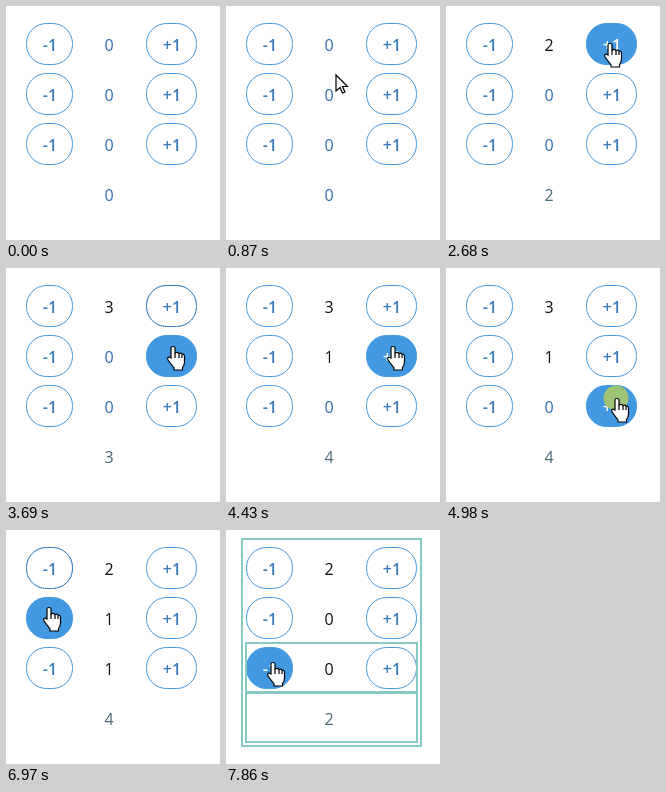
An HTML page with a canvas for the animation above (8000 ms loop, 214 by 234 pixels).

```html
<!DOCTYPE html>
<html lang="en">
<head>
<meta charset="utf-8">
<title>Counters</title>
<style>
html, body { margin: 0; width: 100%; height: 100%; overflow: hidden; background: #fff }
canvas { display: block }
</style>
</head>
<body>
<canvas id="stage" width="214" height="234"></canvas>
<script>
const ctx = document.getElementById('stage').getContext('2d');
const LOOP = 8000, BLUE = '#4299e1', INK = '#2f6cac';

// press time, update time, end of highlight, row, change
const clicks = [
  [1290, 1490, 1750, 0, 1], [2210, 2410, 2680, 0, 1], [3110, 3300, 3500, 0, 1],
  [4030, 4230, 4430, 1, 1], [4960, 5180, 5380, 2, 1], [5970, 6170, 6370, 0, -1],
  [7040, 7240, 7440, 1, -1], [7720, 7860, 8000, 2, -1]
].map(([press, update, end, row, delta]) => ({ press, update, end, row, delta }));

// time, x, y of the pointer
const path = [
  [390, 136, 206], [700, 84, 84], [1150, 163, 37], [3480, 163, 37], [3680, 166, 78],
  [4430, 166, 78], [4900, 170, 130], [5380, 170, 130], [5900, 36, 36],
  [6370, 36, 36], [6750, 42, 77], [7440, 42, 77], [7580, 43, 88], [7650, 46, 132], [8000, 46, 132]
];

const hand = new Path2D('M-1 12V2Q-1 .5 1 .5T3 2V7q2-1.5 4 .5q2-1 3 .8q2.5-.5 2.5 2.2V16q0 3-2 5.5V24H2V22L-4 14Q-5 11-3 11Z');
const knuckles = new Path2D('M3 7v5M7 8v4M10 9v3');
const arrow = new Path2D('M0 0V16L4 12.5L6.5 18L9 17L6.5 11.5H11.5Z');

function pointerAt(t) {
  if (t < path[0][0]) return null;
  const i = Math.max(1, path.findIndex(p => p[0] > t));
  const [t0, x0, y0] = path[i - 1], [t1, x1, y1] = path[i];
  const u = (t - t0) / (t1 - t0), k = u * u * (3 - 2 * u);
  return { x: x0 + (x1 - x0) * k, y: y0 + (y1 - y0) * k };
}

function label(text, x, y, color, weight = 400) {
  ctx.font = `${weight} 16px "Open Sans", "Noto Sans", sans-serif`;
  ctx.fillStyle = color;
  ctx.fillText(text, x, y);
}

function button(row, delta, pointer, t) {
  const x = delta < 0 ? 20.5 : 140.5, w = delta < 0 ? 46 : 50, y = 17.5 + row * 50, h = 41;
  const hover = pointer && pointer.x > x && pointer.x < x + w && pointer.y > y && pointer.y < y + h;
  const last = clicks.filter(c => c.press <= t).pop();
  const pressed = last && last.row === row && last.delta === delta;
  ctx.beginPath();
  ctx.roundRect(x, y, w, h, 20);
  ctx.fillStyle = hover ? BLUE : '#fff';
  ctx.fill();
  ctx.strokeStyle = BLUE;
  ctx.lineWidth = 1;
  ctx.stroke();
  if (pressed && !hover) {
    ctx.setLineDash([1, 1]);
    ctx.strokeStyle = '#2c6496';
    ctx.stroke();
    ctx.setLineDash([]);
  }
  const color = !hover ? '#3a7dbc' : pressed ? '#fff' : BLUE;
  label(delta < 0 ? '-1' : '+1', x + w / 2 + .5, y + 27.5, color, 600);
  return hover;
}

function drawPointer({ x, y }, overButton) {
  ctx.save();
  ctx.translate(Math.round(x), Math.round(y));
  ctx.fillStyle = '#fff';
  ctx.strokeStyle = '#000';
  ctx.lineWidth = 1.2;
  const shape = overButton ? hand : arrow;
  ctx.fill(shape);
  ctx.stroke(shape);
  if (overButton) ctx.stroke(knuckles);
  ctx.restore();
}

function draw(t) {
  const pointer = pointerAt(t);
  const done = clicks.filter(c => c.update <= t);
  const sum = list => list.reduce((n, c) => n + c.delta, 0);
  let overButton = false;

  ctx.fillStyle = '#fff';
  ctx.fillRect(0, 0, 214, 234);
  ctx.textAlign = 'center';
  for (let row = 0; row < 3; row++) {
    for (const delta of [-1, 1]) overButton = button(row, delta, pointer, t) || overButton;
    const own = done.filter(c => c.row === row);
    label(sum(own), 103, 45 + row * 50, own.length ? '#111' : INK);
  }
  label(sum(done), 103, 195, done.length < 2 ? INK : '#4d6874');

  const lit = done.find(c => t < c.end);
  if (lit) {
    ctx.strokeStyle = '#86cac3';
    ctx.lineWidth = 2;
    ctx.strokeRect(16, 9, 179, 207);
    ctx.strokeRect(20, 13 + lit.row * 50, 171, 49);
    ctx.strokeRect(20, 163, 171, 49);
  }
  if (!pointer) return;
  if (clicks.some(c => c.press <= t && t < c.update)) {
    ctx.fillStyle = '#9dc573';
    ctx.beginPath();
    ctx.arc(pointer.x, pointer.y, 12.5, 0, 7);
    ctx.fill();
  }
  drawPointer(pointer, overButton);
}

function tick() {
  draw(performance.now() % LOOP);
  requestAnimationFrame(tick);
}
tick();
</script>
</body>
</html>
```
